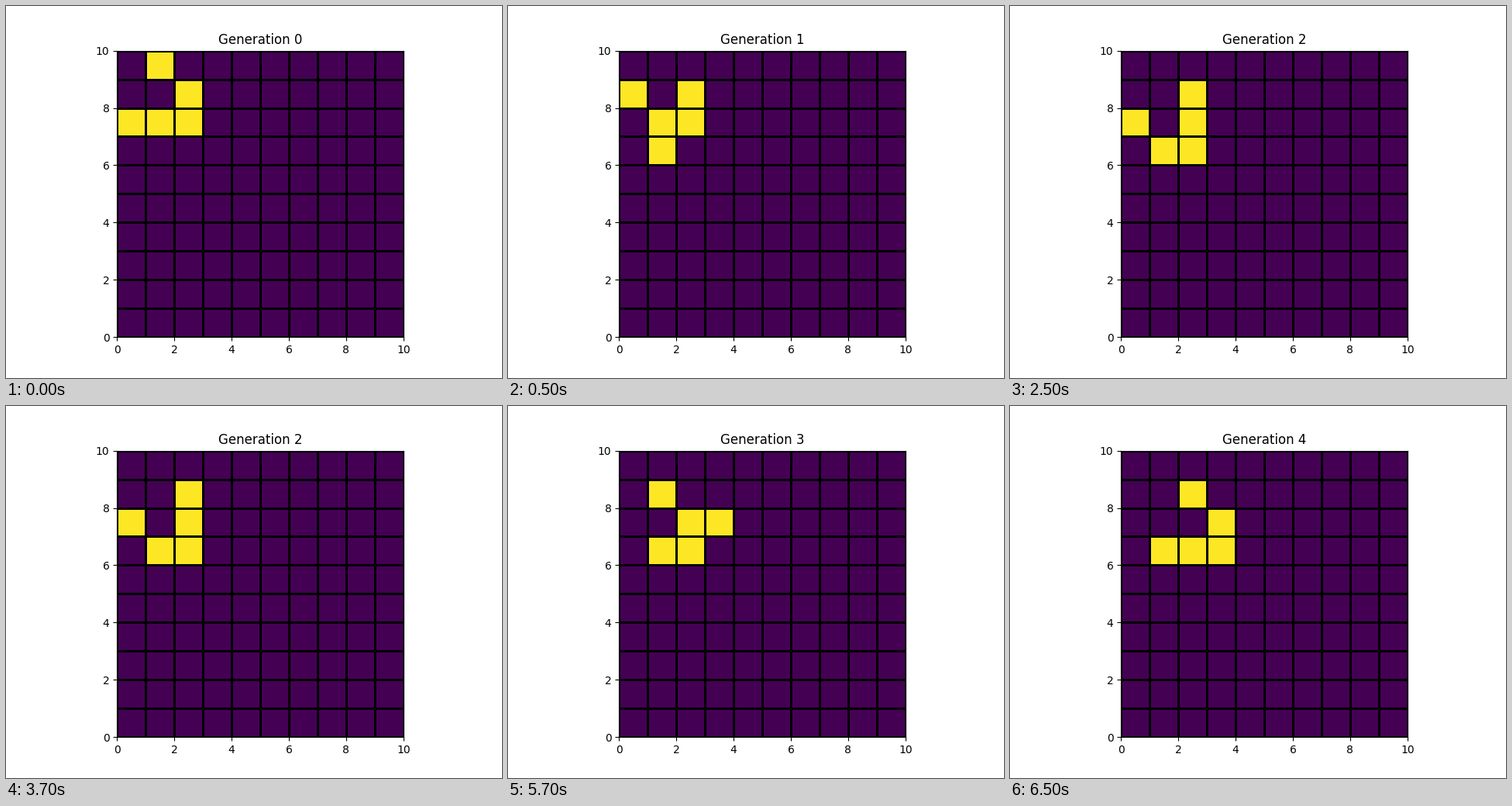
A matplotlib script that plays this animation: 640x480 px, repeating every 8 s.

```python
import numpy as np
import matplotlib.pyplot as plt
from matplotlib.animation import FuncAnimation

SIZE = 10
STEP_MS = 500
FRAMES = 16
FRAMES_PER_GENERATION = 4
GLIDER = [(0, 1), (1, 2), (2, 0), (2, 1), (2, 2)]


def next_generation(grid):
    """One step of Conway's Game of Life on a wrapped board."""
    neighbours = sum(
        np.roll(grid, (dy, dx), axis=(0, 1))
        for dy in (-1, 0, 1)
        for dx in (-1, 0, 1)
        if (dy, dx) != (0, 0)
    )
    return ((neighbours == 3) | ((grid == 1) & (neighbours == 2))).astype(int)


def generation_at(frame):
    # The starting board is shown for a single step only.
    return (frame + FRAMES_PER_GENERATION - 1) // FRAMES_PER_GENERATION


start = np.zeros((SIZE, SIZE), dtype=int)
start[tuple(zip(*GLIDER))] = 1
boards = [start]
for _ in range(generation_at(FRAMES - 1)):
    boards.append(next_generation(boards[-1]))

fig, ax = plt.subplots(figsize=(6.4, 4.8), dpi=100)
ax.set_aspect("equal")
mesh = ax.pcolormesh(start[::-1], cmap="viridis", vmin=0, vmax=1,
                     edgecolors="black", linewidth=2)
title = ax.set_title("Generation 0")


def update(frame):
    generation = generation_at(frame)
    mesh.set_array(boards[generation][::-1])
    title.set_text(f"Generation {generation}")
    return mesh, title


anim = FuncAnimation(fig, update, frames=FRAMES, interval=STEP_MS,
                     repeat=True, repeat_delay=0)
plt.show()
```
